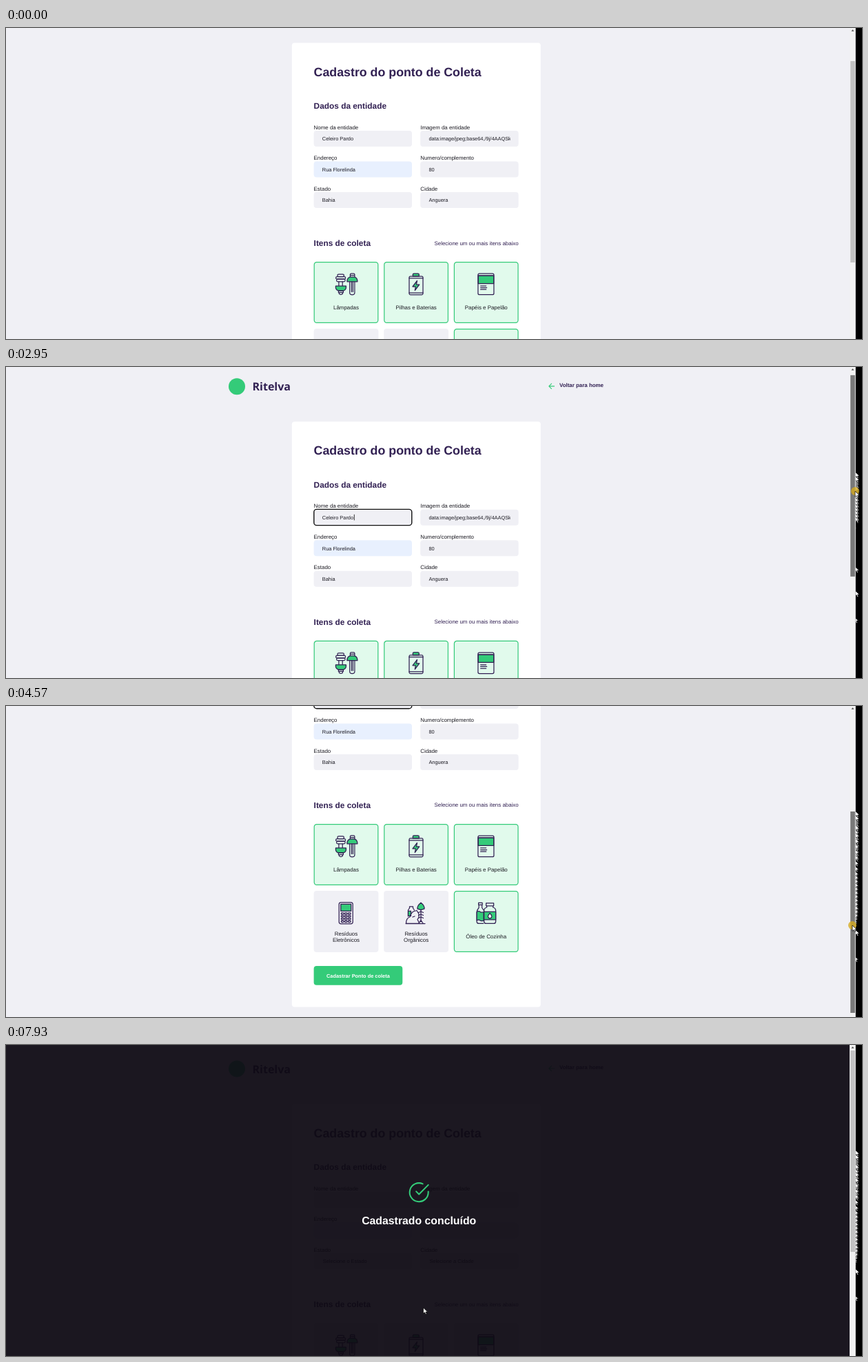
An HTML page that plays this animation: 1242 px wide and 451 px high, repeating every 8 s.

```html
<!DOCTYPE html>
<html lang="pt-BR">
<head>
<meta charset="utf-8">
<title>Cadastro do ponto de Coleta</title>
<style>
  html, body { margin: 0; width: 100%; height: 100%; overflow: hidden; background: #f0f0f5; }
  svg { display: block; }
  text { font-family: "Liberation Sans", Arial, sans-serif; fill: #1b1a22; text-rendering: geometricPrecision; white-space: pre; }
  .b { font-weight: 700; }
  .title { fill: #322153; }
  .light { fill: #fff; }
  .logo { font-family: "Noto Sans", sans-serif; }
  .icon { fill: none; stroke: #322153; stroke-width: 1.25; stroke-linejoin: round; stroke-linecap: round; }
  .g { fill: #34cb79; }
  .green { fill: none; stroke: #34cb79; stroke-linecap: round; stroke-linejoin: round; }
</style>
</head>
<body>
<svg id="stage" width="1242" height="451" viewBox="0 0 1242 451"></svg>
<script>
const LEFT = 446.6, RIGHT = 743.7, ROW = 44.5;
const LABEL = 7.91, INPUT = 7.42;

const text = (x, y, str, size, cls = '', anchor = 'start') =>
  `<text x="${x}" y="${y}" font-size="${size}" class="${cls}" text-anchor="${anchor}">${str}</text>`;
const rect = (x, y, w, h, r, fill, more = '') =>
  `<rect x="${x}" y="${y}" width="${w}" height="${h}" rx="${r}" fill="${fill}" ${more}/>`;
const path = (d, cls = '') => `<path d="${d}" class="${cls}"/>`;

// Form fields: label, value, value after the form is reset
const fields = [
  ['Nome da entidade', 'Celeiro Pardo', ''],
  ['Imagem da entidade', 'data&#58;image/jpeg;base64,/9j/4AAQSk', ''],
  ['Endereço', 'Rua Florelinda', ''],
  ['Numero/complemento', '80', ''],
  ['Estado', 'Bahia', 'Selecione o Estado'],
  ['Cidade', 'Anguera', 'Selecione a Cidade'],
];

function field([label, value, empty], i) {
  const x = i % 2 ? 601.2 : LEFT, y = 213 + ROW * (i >> 1);
  return text(x, y - 2.4, label, LABEL) +
    rect(x, y, 142.4, 23, 4, i === 2 ? '#e8f0fe' : '#f0f0f5') +
    `<svg x="${x + 12.2}" y="${y}" width="118.4" height="23">
      <g class="filled">${text(0, 14.2, value, INPUT)}</g>
      <g class="empty">${text(1, 14.2, empty, INPUT)}</g></svg>`;
}

const keypad = [0, 1, 2, 3].map(r => [9, 14, 19].map(x =>
  rect(x, 16 + r * 3.8, 3.6, 2.2, .8, 'none')).join('')).join('');
const ribs = [14, 18, 22].map(y => `M19.5 ${y + 1.5}L23 ${y}L26.5 ${y + 1.5}`).join('');

// Each icon is drawn in a 32 by 32 box
const icons = {
  lamp: rect(3.5, 2, 9.5, 3.6, 1.8, 'none') + rect(1.2, 5.6, 14, 3.6, 1.8, 'none') +
    rect(2.2, 9.2, 12.5, 3.6, 1.8, 'none') + path('M5.5 13v6M10.8 13v6') +
    path('M1 19h15v2.5q0 3-4 4.5H5q-4-1.5-4-4.5z', 'g') +
    path('M5 26h7v2.6H5zM6 28.6h5v2q-2.5 2-5 0z') +
    path('M22 6V2.5q0-1.5 1.5-1.5h3.5q1.500 0 1.500 1.500V6M22 3.600h6.500') +
    path('M17.500 12.800q0-6.600 5.500-6.800h4q5.500.200 5.500 6.800z', 'g') +
    path('M21.300 13v16q0 2.800 3.600 2.800t3.600-2.800V13M24 13v14.500M26 13v14.500'),
  battery: path('M11.300 5V2.500q0-1.500 1.500-1.500h6q1.500 0 1.500 1.500V5z', 'g') +
    rect(6, 5, 20, 26.800, 1.800, 'none') + path('M6 7.800h20M6 29h20') +
    path('M17.500 11.500L11 20h4.300l-1 5.500L20.800 17h-4.300z', 'g'),
  paper: path('M4.500 4.200h22.500v11.300H4.500z', 'g') + rect(4.300, 1.200, 23, 30.500, 2, 'none') +
    path('M4.500 4.200h22.500M8 19h8M8 21.600h9M8 24.200h8'),
  device: rect(5.800, .800, 20, 31, 2.800, 'none') + path('M8.300 3.500h15v9.800h-15z', 'g') + keypad,
  organic: path('M4.500 21v-9l2-3V7h5v2l2 3', '') + path('M4.500 13.500h4v7h-4z', 'g') +
    path('M1.500 31.500q0-8 5.500-9.500q1-5 5-8l5-1.500l3 5v5l-2 3l3 6zM1 31.600h28M11 22l3-1') +
    path('M23 1.200q5.500 4 5 9l-5 1.500l-5-1.500q-.500-5 5-9z', 'g') +
    path('M23 12v17M20 31l3-4.500l3 4.500' + ribs),
  oil: path('M5 1.500h5.500v3H5zM5.500 4.500v4q-3 3.500-3 7v13q0 3 3 3h6.500M10 4.500v4l3 4.500') +
    path('M2.500 14.500q3-1.500 5 0t5 0V27q-2.500 1.500-5 0t-5 0z', 'g') +
    path('M16 2h11v3.800H16zM17 5.800v2.200q-4 1-4 5v15.500q0 3 3 3h11q3 0 3-3V13q0-4-4-5V5.800') +
    path('M13 14.500h17v11.500H13z', 'g') +
    '<path d="M21.500 16.500q3 3.500 2.700 5q-.700 2.500-2.700 2.500t-2.700-2.500q-.300-1.500 2.700-5z" fill="#fff"/>',
};

const items = [
  ['lamp', 1, 'Lâmpadas'], ['battery', 1, 'Pilhas e Baterias'], ['paper', 1, 'Papéis e Papelão'],
  ['device', 0, 'Resíduos', 'Eletrônicos'], ['organic', 0, 'Resíduos', 'Orgânicos'], ['oil', 1, 'Óleo de Cozinha'],
];

function item([icon, on, ...lines], i) {
  const x = LEFT + 101.6 * (i % 3), y = 403 + 97 * (i / 3 | 0);
  const first = lines.length > 1 ? 64.6 : 69.4;
  return `<g transform="translate(${x} ${y})">` + rect(0, 0, 93.8, 89, 4, '#f0f0f5') +
    (on ? `<g class="filled">${rect(.6, .6, 92.6, 87.8, 3.6, '#e1faec', 'stroke="#34cb79" stroke-width="1.2"')}</g>` : '') +
    `<g class="icon" transform="translate(30.8 16)">${icons[icon]}</g>` +
    lines.map((s, n) => text(46.9, first + n * 9.2, s, LABEL, '', 'middle')).join('') + '</g>';
}

const stage = document.getElementById('stage');
stage.innerHTML = `
  <defs>
    <path id="arrow" d="M0 0V8.400L2 6.600L3.400 9.600L4.800 9L3.500 6.100H6.200z" fill="#fff" stroke="#000" stroke-width=".7"/>
    <clipPath id="strip"><rect x="1233" width="9" height="451"/></clipPath>
  </defs>
  ${rect(0, 0, 1242, 451, 0, '#f0f0f5')}
  <g id="page">
    <circle cx="335" cy="34.500" r="12" fill="#34cb79"/>
    ${text(357.5, 40.5, 'Ritelva', 16, 'logo b title')}
    <path class="green" d="M795.500 34H788M791.500 30.300L787.800 34L791.500 37.700" stroke-width="1.100"/>
    ${text(803, 35.4, 'Voltar para home', LABEL, 'b title')}
    ${rect(414.800, 85.500, 361, 583, 4, '#fff')}
    ${text(LEFT, 133.5, 'Cadastro do ponto de Coleta', 17.8, 'b title')}
    ${text(LEFT, 181.1, 'Dados da entidade', 11.87, 'b title')}
    ${fields.map(field).join('')}
    <g id="focus">
      ${rect(446.8, 212.500, 142, 23.300, 4, 'none', 'stroke="#101010" stroke-width="1.400"')}
      <path d="M505.300 220v8.500" stroke="#000" stroke-width=".8"/>
    </g>
    ${text(LEFT, 380.1, 'Itens de coleta', 11.87, 'b title')}
    ${text(RIGHT, 378.5, 'Selecione um ou mais itens abaixo', LABEL, 'title', 'end')}
    ${items.map(item).join('')}
    ${rect(LEFT, 609, 128.700, 27.700, 4, '#34cb79', 'id="button"')}
    ${text(510.9, 625.6, 'Cadastrar Ponto de coleta', INPUT, 'b light', 'middle')}
  </g>
  <g id="done">
    ${rect(0, 0, 1224, 451, 0, '#0e0a14', 'opacity=".94"')}
    <g class="green" transform="translate(583 197.500) scale(1.350)" stroke-width="1.500">
      <path d="M22 11.080V12a10 10 0 1 1-5.930-9.140M22 4L12 14.010L9 11.010"/>
    </g>
    ${text(599.2, 260, 'Cadastrado concluído', 15.82, 'b light', 'middle')}
  </g>
  ${rect(1224.500, 0, 8.500, 451, 0, '#f1f1f1')}
  <path d="M1226.500 4.800h4l-2-2.500z" fill="#505050"/>
  ${rect(1225.200, 8, 6.600, 292, 0, '#c1c1c1', 'id="thumb"')}
  ${rect(1232.800, 0, 9.200, 451, 0, '#000')}
  <g id="trail" clip-path="url(#strip)"></g>
  <circle id="press" r="6" fill="#d6aa1e" fill-opacity=".78"/>
  <use id="cursor" href="#arrow"/>`;

const $ = id => document.getElementById(id);
const show = (el, on) => el.setAttribute('visibility', on ? 'visible' : 'hidden');
const within = (t, a, b) => t >= a && t < b;

// Keys are [time, ...values], joined by straight lines
function sample(keys, t) {
  let i = keys.findIndex(k => k[0] > t);
  if (i < 0) return keys[keys.length - 1].slice(1);
  if (i === 0) return keys[0].slice(1);
  const a = keys[i - 1], b = keys[i], f = (t - a[0]) / (b[0] - a[0]);
  return a.slice(1).map((v, n) => v + (b[n + 1] - v) * f);
}

const scrollKeys = [
  [1230, 64], [1500, 46], [1990, 7], [2390, 0], [2810, 0], [2950, 6],
  [3450, 92], [4420, 227], [4570, 232], [4750, 233.5],
];
const cursorKeys = [
  [390, 1231, 452], [460, 1230.5, 362], [530, 1232, 324], [600, 1231.5, 289], [670, 1228, 228],
  [740, 1222, 214], [1090, 1222, 214], [1160, 1232, 217], [1230, 1232, 216], [1500, 1232, 198],
  [1990, 1232, 165], [2390, 1232, 152], [2810, 1232, 152], [2950, 1232, 180], [3450, 1231, 237],
  [4200, 1231, 296], [4420, 1228.5, 312], [4570, 1228, 318], [4700, 1227, 320], [4890, 958, 335],
  [5040, 945, 336], [5780, 563, 361], [5850, 553, 368], [6050, 530, 378], [6600, 492.5, 383.5],
  [7860, 492.5, 383.5], [7930, 605.5, 381],
];

// The cursor leaves stamps behind on the black strip
const stamps = [];
for (let t = 460; t < 4400; t += 70) {
  const [x, y] = sample(cursorKeys, t);
  $('trail').insertAdjacentHTML('beforeend', `<use href="#arrow" x="${x}" y="${y}"/>`);
  stamps.push([t, $('trail').lastChild]);
}

const filled = stage.querySelectorAll('.filled'), empty = stage.querySelectorAll('.empty');

function draw(t) {
  const done = t >= 7000;
  const scroll = done ? 0 : sample(scrollKeys, t)[0];
  const [x, y] = sample(cursorKeys, t);
  $('page').setAttribute('transform', `translate(0 ${-scroll})`);
  $('thumb').setAttribute('y', 8 + scroll * .625);
  $('thumb').setAttribute('fill', within(t, 1230, 4700) ? '#787878' : within(t, 670, 1230) ? '#a8a8a8' : '#c1c1c1');
  $('button').setAttribute('fill', x < 575 && y > 375.5 && !done ? '#2fb86e' : '#34cb79');
  $('cursor').setAttribute('transform', `translate(${x} ${y})`);
  $('press').setAttribute('transform', `translate(${x} ${y})`);
  show($('cursor'), t >= 390);
  show($('press'), within(t, 1230, 4700) || within(t, 6730, 6800));
  show($('focus'), within(t, 1230, 5040));
  show($('done'), done);
  filled.forEach(el => show(el, !done));
  empty.forEach(el => show(el, done));
  stamps.forEach(([at, el]) => show(el, t >= at));
}

const start = performance.now();
function frame() {
  draw((performance.now() - start) % 8000);
  requestAnimationFrame(frame);
}
frame();
</script>
</body>
</html>
```
